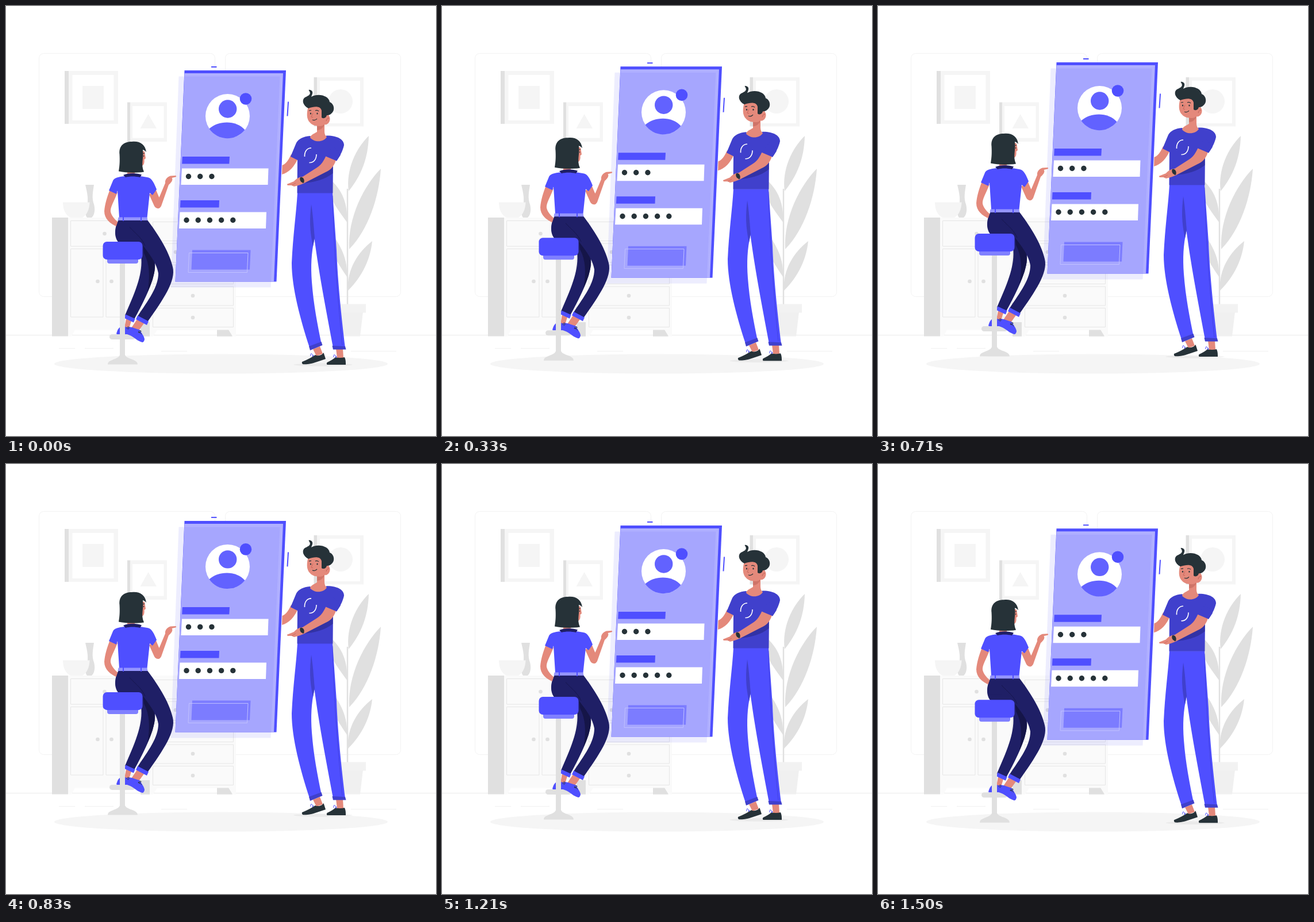
Recreate the animation shown at these times as an HTML page with a canvas. Size 748 by 748 pixels, loop 1.54 s.

```html
<!DOCTYPE html>
<html lang="en">
<head>
<meta charset="utf-8">
<title>Sign-in scene</title>
<style>
html, body { margin: 0; width: 100%; height: 100%; overflow: hidden; background: #fff; }
canvas { display: block; width: 748px; height: 748px; }
</style>
</head>
<body>
<canvas id="stage" width="748" height="748"></canvas>
<script>
const ctx = document.getElementById('stage').getContext('2d');
const BLUE = '#4f4fff', DEEP = '#4040cc', NAVY = '#1f1f66', INK = '#263238';
const SKIN = '#e4897b', GREY = '#e0e0e0', PALE = '#f5f5f5', LINE = '#ebebeb';

const LOOP = 1540, STEPS = 37;
// [step, vertical offset]
const FLOAT = [[0, 0], [8, -6.8], [14, -11.6], [18, -14.8], [20, -13.1], [26, -8], [32, -2.1], [36, 0.3]];

function fill(color, d) {
  ctx.fillStyle = color;
  ctx.fill(new Path2D(d));
}
function stroke(color, width, d) {
  ctx.strokeStyle = color;
  ctx.lineWidth = width;
  ctx.stroke(new Path2D(d));
}
function box(color, x1, y1, x2, y2, r = 0) {
  ctx.fillStyle = color;
  ctx.beginPath();
  ctx.roundRect(x1, y1, x2 - x1, y2 - y1, r);
  ctx.fill();
}
function outline(color, x1, y1, x2, y2, r = 0) {
  ctx.strokeStyle = color;
  ctx.lineWidth = 1;
  ctx.beginPath();
  ctx.roundRect(x1, y1, x2 - x1, y2 - y1, r);
  ctx.stroke();
}
function oval(color, x, y, rx, ry = rx, turn = 0) {
  ctx.fillStyle = color;
  ctx.beginPath();
  ctx.ellipse(x, y, rx, ry, turn, 0, 7);
  ctx.fill();
}

function drawWall() {
  outline('#f2f2f2', 57.5, 82.5, 363.5, 505.5, 8);
  outline('#f2f2f2', 381.5, 82.5, 686.5, 505.5, 8);
  stroke(LINE, 1, 'M0 572.5H748');
  stroke('#f0f0f0', 1, 'M92 595.5H120M137 595.5H187M270 600.5H315M600 600.5H679');

  box(GREY, 102, 113, 109, 205);
  box(PALE, 109, 113, 195, 205);
  box('#fff', 115.5, 120, 187.5, 199);
  box(PALE, 133, 139, 170, 179);

  box(GREY, 211, 167.5, 216, 236);
  box(PALE, 216, 167.5, 280, 236);
  box('#fff', 220, 174, 274.5, 229.5);
  fill(PALE, 'M247.5 188L262 213H233.5Z');

  box(GREY, 535.5, 124, 541, 209.5);
  box(PALE, 541, 124, 622, 209.5);
  box('#fff', 546, 130, 616, 204);
  oval(PALE, 582, 166, 21);
}

function drawDresser() {
  fill(GREY, 'M138 311H153C151 324 149 334 153 345C156 356 153 365 149 368H141C136 362 138 350 142 342C143 330 140 320 138 311Z');
  fill(PALE, 'M99 341.5H145.500C145 355 140 364 133 368H112C104 364 99 355 99 341.5Z');
  box(GREY, 234, 540, 250, 574.5);
  fill(GREY, 'M367 563H391L394 574.500H367Z');
  fill('#fafafa', 'M108 368H400V574.500H394L387 563.500H263L256 574.500H250V563.500H120L114 574.500H108Z');
  box(GREY, 80, 368, 108, 574.5);
  box(GREY, 234, 550, 250, 574.5);
  fill(GREY, 'M367 564H387.500L393 574.500H367Z');
  outline('#e6e6e6', 112.5, 373.5, 233.5, 418);
  outline('#e6e6e6', 112.5, 422.5, 169, 541);
  outline('#e6e6e6', 174, 422.5, 233.5, 541);
  for (let i = 0; i < 5; i++) outline('#e6e6e6', 255.5, 375.5 + i * 37.5, 395.5, 408.5 + i * 37.5);
  for (const [x, y] of [[171.5, 396], [159.5, 479], [183.5, 479], [295, 428], [325, 504], [325, 542]])
    oval(GREY, x, y, 3.3);
}

function drawPlant() {
  stroke(GREY, 2.5, 'M594 522V318');
  fill(GREY, 'M631 226C608 248 591 286 596 322C618 295 630 265 631 226Z');
  fill(GREY, 'M652 283C623 312 594 368 597 423C630 390 649 332 652 283Z');
  fill(GREY, 'M637 409C612 428 592 460 595 495C620 470 634 440 637 409Z');
  fill(GREY, 'M562 300C560 336 575 350 593 376C595 345 586 320 562 300Z');
  fill(GREY, 'M562 390C562 430 580 450 593 471C595 440 582 415 562 390Z');
  fill('#f0f0f0', 'M566 532H621L616 574.500H572Z');
  box('#f2f2f2', 561, 518.5, 626, 533.5);
}

function drawPhone() {
  fill(BLUE, 'M310.5 112H487L470.5 479.500H294.5Z');
  fill('#b0b0ff', 'M310.5 117H482L466 479.500H294.5Z');
  fill('rgba(78,78,240,.1)', 'M300.5 122.500H476.500L460.5 489.500H286.5Z');
  stroke(BLUE, 2, 'M357 106H366.5');
  stroke(BLUE, 2, 'M491 166.5L489.500 191.5');

  oval('#fff', 385.5, 191.5, 38.5);
  oval('#6262ff', 385.7, 179, 15.7);
  fill('#6262ff', 'M353.5 213.500C370 198.500 401 198.500 415.500 215.500A38.5 38.5 0 0 1 353.5 213.500Z');
  oval(BLUE, 417, 161.5, 10.3);

  fill(BLUE, 'M306.800 262H389L388.300 274.500H306.200Z');
  fill('#fff', 'M306 282.500H456.500L455.5 311H304.5Z');
  fill(BLUE, 'M303.500 338H371L370.500 350.500H302.900Z');
  fill('#fff', 'M302.500 358.500H453L452 387H301Z');
  for (let i = 0; i < 3; i++) oval(INK, 317.5 + i * 20.2, 296.5, 4.7);
  for (let i = 0; i < 5; i++) oval(INK, 314 + i * 20.2, 372.5, 4.7);

  fill('#7c7cff', 'M324 424.500H425.500L424 458.500H322.500Z');
  stroke('#c0c0ff', 1, 'M318.500 429.500H421L419.500 463.500H317Z');
}

function drawWomanLegs() {
  fill(SKIN, 'M209 544L218 548L214 561L206 560Z');
  fill(BLUE, 'M192 570C194 562 198 557 203 557L215 560L216 571H193Z');
  fill(NAVY, 'M230 405L250 415C259 432 260 446 259 457C256 482 240 514 222 547L207 538C228 490 238 465 235 435Z');
  fill('#151548', 'M238 412C252 424 262 446 258 463C255 479 249 492 246 498C251 472 250 448 240 430Z');
  fill(BLUE, 'M208 536.500L224.500 544L222 550.500L206 543Z');
}

function drawStoolPost() {
  box(GREY, 198, 444, 207, 612);
  box(GREY, 180, 571, 225, 580, 4.5);
  fill(GREY, 'M198 607H207C209 613 222 614 227 619Q229 621 229 623.500H177Q177 620 180 618C187 614 196 613 198 607Z');
}

function drawWoman() {
  drawWomanLegs();
  drawStoolPost();

  fill(SKIN, 'M228 545L240 552L230 566L218 560Z');
  fill(BLUE, 'M213 558C220 558 226 562 232 563C237 570 241 576 241 580Q240 585 237 585C229 583 224 577 216 573L208 570Z');
  stroke(INK, 1, 'M210 560q3 -4 4 0q-1 4 -4 0M230 568q4 -6 5 -2q-3 4 -5 1q4 1 6 4');
  fill(NAVY, 'M196 372.500H246C261 392 284 426 290 454C296 478 274 510 245 551L228 541C248 511 265 489 265 465C262 445 245 426 237 415L199 414C186 405 189 383 196 372.500Z');
  stroke('#151548', .8, 'M207 375C220 393 235 400 242 417');
  fill(BLUE, 'M229 538.500L248 548.500L245 555L226 545Z');

  fill(SKIN, 'M181 319L194 324C188 340 181 350 182 358C184 366 190 372 197 378L194 384C181 379 171 370 171 357C172 344 176 332 181 319Z');
  fill(NAVY, 'M196 372.500H215V400H191C189 388 193 378 196 372.500Z');
  fill(SKIN, 'M249 328L261 320C263 325 265 330 266.500 333L277 308C276 302 281 297 286 295.500L295 295Q297.500 296 295 297.500L288.500 299C291 302 288 307 283 311L270 348C267 354 261 353 258 348Z');
  fill(SKIN, 'M211 285H224V297H211Z');
  fill(BLUE, 'M206 296C196 297 188 299 186 304L179 321L192 327L194 321L197 368H245.500L250 325L255 329L262 319C258 309 254 299 246 298L234 296Z');
  fill(NAVY, 'M204 294C212 290 228 290 236 293.500L233 298C225 296 215 296 208 298Z');
  fill('#9494ff', 'M195.500 367.500H245.500L246.500 373H194.500Z');
  stroke(BLUE, 2, 'M204 366.500V374M235 366.500V374');

  fill(SKIN, 'M231 251L241 253L243 265L240.500 267C241 273 240 277 236 278L231 276Z');
  stroke(INK, 1.2, 'M238.500 257L241 256M239.500 260V262');
  fill(INK, 'M197.500 258C196 244 204 236 219 236C232 234.500 242 240 244 254C241 251 239 250 238 250C240 265 234 276 240 288.500C225 291 208 290 196 287.500C198 276 198 268 197.500 258Z');

  box('#8080ff', 176, 436, 230, 448, 4);
  box(BLUE, 168.5, 410, 237.5, 441, 7);
}

function drawManFace() {
  fill(SKIN, 'M541 203V219C536 222 530 224 529 229C537 238 552 237 558 228C555 225 554 222 554 218V198Z');
  fill('#cf7468', 'M541 208C546 210 550 209 554 206C552 212 547 216 541 216Z');
  fill(SKIN, 'M526 175C523 184 522 197 529 203C535 210 547 210 553 206C561 209 568 196 560 189L551 172Z');
  fill(INK, 'M526 178C516 173 514 163 520 159C526 156 532 154 527 147C525 145 531 145 533 149C534 152 532 155 531 158C543 151 562 156 563 167C571 170 573 182 566 187C563 190 560 190 558 190C557 194 553 197 549 194L549 182C547 174 538 174 526 178Z');
  oval(INK, 530, 187, 1.1, 1.5);
  oval(INK, 541.5, 187, 1.1, 1.5);
  stroke(INK, 1.2, 'M527 182L531 181.500M538 182Q541 180.500 544 183M533 198Q538 200 541 196');
  stroke('#c9655b', 1, 'M534 186L531 193L534 194');
  stroke('#b75a51', .8, 'M557 200Q558 195 562 195');
}

function drawMan() {
  oval('rgba(0,0,0,.045)', 551.5, 624, 51, 2.8);
  fill(SKIN, 'M534 597L546 592L551 605L540 609Z');
  fill(SKIN, 'M574 596H586L587 612H576Z');
  fill(INK, 'M515 619C525 615 532 611 538 607C543 610 550 607 552.500 603L556 614L541 619C530 623 521 624 516 623Q514 621 515 619Z');
  fill(INK, 'M558.500 620C565 617 570 614 573 611Q581 613 589 611C591 615 591 619 591 624H558.500Q557 622 558.500 620Z');
  stroke(BLUE, 1, 'M530 609q-1 -5 2 -4q3 3 1 5q4 -5 0 -1M570 611q-1 -5 2 -4q3 3 1 5q4 -4 1 -2');

  fill(BLUE, 'M507 325H568L575 425C577 480 584 545 590 594H569C560 545 545 470 536.500 405C531 430 530 452 532 480C535 520 542 555 549 589L528 594C512 545 497 490 497 447C499 400 505 360 507 325Z');
  fill(DEEP, 'M531 345C528 370 528 390 534 418L537 403C535 381 534 362 531 345Z');
  stroke('rgba(45,45,190,.5)', .8, 'M568 330C570 420 577 510 585 590');
  fill(DEEP, 'M527 592L548.500 584L550.500 590L529 599Z');
  fill(DEEP, 'M567.500 591L590 592L591.500 597.500H569Z');

  fill(SKIN, 'M496 258L508 265C502 279 492 290 480 293L480.500 277C487 275 492 267 496 258Z');
  fill(DEEP, 'M529 226C517 227 509 231 505 238L495 262L507 268L506.500 325.500H568.500L569 266L575 269.500C580 263 586 252 588 242C588 232 576 225 557 225.500C552 236 536 235 529 226Z');
  fill('#3232a5', 'M517 307L557 287L568.500 279V291C555 302 535 307 517 308Z');
  drawManFace();
  stroke('#fff', 1.6, 'M519.500 262C519 254 523 247 531 247M527.500 272.500C535 273 540 267 540 258');

  fill(SKIN, 'M557 260L574 268C570 281 563 286 556 289L519 308C513 311 506 313 501 314L497 312L490 312Q487.500 309.500 491 309L501 305C505 300 511 297 516 297L541 281C548 277 553 269 557 260Z');
  fill(DEEP, 'M555 261L575 269.500L582 259L570 244Z');
  stroke('#c9655b', .8, 'M497 312L504 308');
  stroke(INK, 3, 'M512.500 298L517.500 307.500');
  oval(INK, 515, 302.500, 3.4, 4.5, -.4);
}

function offsetAt(step) {
  const i = FLOAT.findIndex(([s]) => s >= step);
  if (i < 1) return FLOAT[0][1];
  const [s0, y0] = FLOAT[i - 1], [s1, y1] = FLOAT[i];
  return y0 + (y1 - y0) * (step - s0) / (s1 - s0);
}

function draw() {
  const time = performance.now() % LOOP;
  const step = Math.min(STEPS - 1, Math.floor((time + 5) * STEPS / LOOP));
  ctx.clearRect(0, 0, 748, 748);
  drawWall();
  drawDresser();
  drawPlant();
  oval(PALE, 374, 622.5, 290, 17);
  ctx.save();
  ctx.translate(0, offsetAt(step));
  drawPhone();
  drawMan();
  drawWoman();
  ctx.restore();
  requestAnimationFrame(draw);
}
draw();
</script>
</body>
</html>
```
